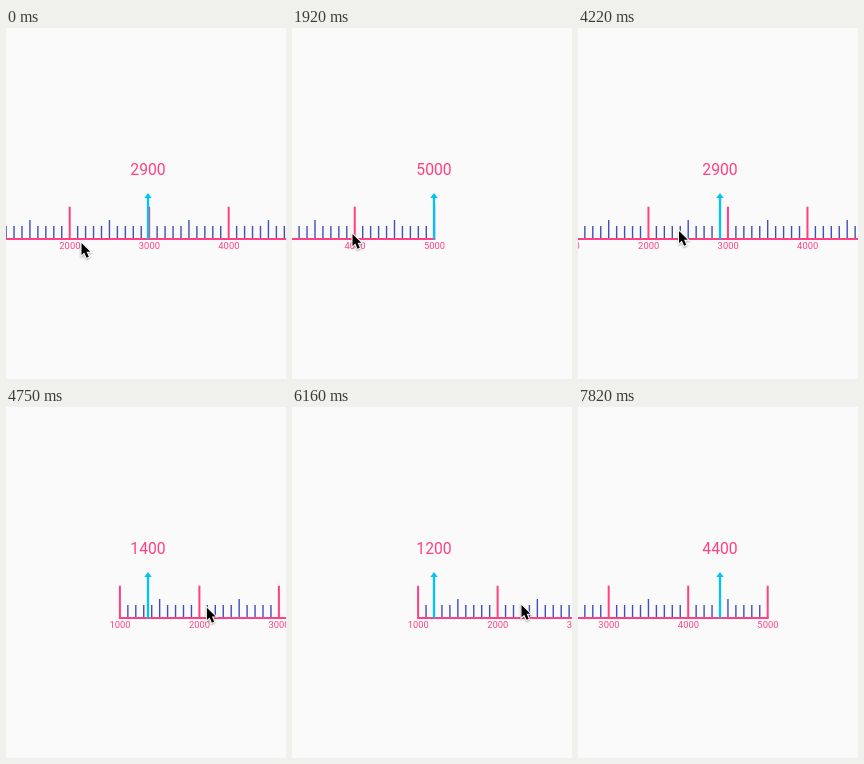
These frames come from a looping animation (280x351 px, 8190 ms). An HTML page with a canvas:

```html
<!DOCTYPE html>
<html lang="en">
<head>
<meta charset="utf-8">
<title>Ruler picker</title>
<style>
html, body { margin: 0; width: 100%; height: 100%; overflow: hidden; background: #fafafa; }
canvas { display: block; width: 280px; height: 351px; }
</style>
</head>
<body>
<canvas id="stage"></canvas>
<script>
const W = 280, H = 351, LOOP = 8190, STEP = 87.8;
const MIN = 1000, MAX = 5000, CENTER = 142, BASE = 211, SCALE = 0.0795;
const PINK = '#ff4081', INDIGO = '#3f51b5', CYAN = '#00c4f5';

const canvas = document.getElementById('stage');
const ctx = canvas.getContext('2d');
const dpr = window.devicePixelRatio || 1;
canvas.width = W * dpr;
canvas.height = H * dpr;
ctx.scale(dpr, dpr);

const smooth = p => p * p * (3 - 2 * p);
const glide = p => 1 - (1 - p) ** 5;
const move = (start, end, to, ease = smooth) => ({ start, end, to, ease });

// Follows a chain of eased moves; positions are arrays of coordinates.
function follow(from, moves, t) {
  let pos = from;
  for (const m of moves) {
    if (t <= m.start) break;
    const p = m.ease(Math.min((t - m.start) / (m.end - m.start), 1));
    pos = pos.map((v, i) => v + (m.to[i] - v) * p);
  }
  return pos;
}

// Ruler value under the arrow: drags, glides and snaps to a tick.
const scroll = [
  move(0, 80, [3000]),
  move(690, 1050, [4730]),
  move(1050, 2540, [5000], glide),
  move(3160, 4000, [2900]),
  move(4220, 5360, [1277], glide),
  move(5360, 5540, [1200]),
  move(6330, 6750, [4392]),
  move(6765, 6840, [4400])
];

const pointer = [
  move(90, 640, [213, 206]),
  move(690, 1050, [75, 209]),
  move(1050, 1740, [60, 205]),
  move(2750, 3150, [39.5, 199]),
  move(3160, 3520, [158, 203]),
  move(3690, 4130, [100.5, 202]),
  move(4220, 4570, [204, 200]),
  move(4570, 5270, [180, 199]),
  move(5450, 6240, [231, 197]),
  move(6330, 6750, [108.5, 217]),
  move(7130, 7780, [266, 355])
];

const valueAt = t => follow([2985], scroll, t)[0];

function vline(x, top, width, color) {
  ctx.fillStyle = color;
  ctx.fillRect(x - width / 2, top, width, BASE - top);
}

function label(text, x, y, size) {
  ctx.font = `${size}px Roboto, sans-serif`;
  ctx.textAlign = 'center';
  ctx.fillStyle = PINK;
  ctx.fillText(text, x, y);
}

function polygon(points) {
  ctx.beginPath();
  points.forEach(([x, y]) => ctx.lineTo(x, y));
  ctx.closePath();
}

function drawRuler(value) {
  const toX = v => CENTER + (v - value) * SCALE;
  for (let v = MIN; v <= MAX; v += 100) {
    const x = toX(v);
    if (x < -20 || x > W + 20) continue;
    if (v % 1000 === 0) {
      vline(x, 178.7, 2, PINK);
      label(v, x + 0.2, 221, 9.4);
    } else {
      vline(x, v % 500 ? 198 : 192, 1.4, INDIGO);
    }
  }
  const left = Math.max(toX(MIN) - 1, 0);
  ctx.fillStyle = PINK;
  ctx.fillRect(left, BASE - 1, Math.min(toX(MAX) + 1, W) - left, 2);
}

function drawArrow() {
  vline(CENTER, 168, 2.3, CYAN);
  polygon([[CENTER, 165], [CENTER + 3.7, 170], [CENTER - 3.7, 170]]);
  ctx.fill();
}

function drawPointer(x, y) {
  ctx.save();
  ctx.translate(x + 0.5, y + 1);
  ctx.scale(0.84, 0.84);
  polygon([[0, 0], [0, 14.5], [3.3, 11.4], [6, 17.6], [8.7, 16.4], [6, 10.4], [10.5, 10.4]]);
  ctx.shadowColor = 'rgba(0,0,0,.35)';
  ctx.shadowBlur = 2 * dpr;
  ctx.shadowOffsetY = dpr;
  ctx.strokeStyle = '#fff';
  ctx.lineWidth = 2.4;
  ctx.stroke();
  ctx.shadowColor = 'transparent';
  ctx.fillStyle = '#000';
  ctx.fill();
  ctx.restore();
}

// The readout trails the ruler in its direction of travel.
function readout(t, value) {
  const n = value / 100;
  const falling = valueAt(t - STEP) > value;
  return 100 * (falling ? Math.ceil(n - 0.05) : Math.floor(n + 0.05));
}

function draw(now) {
  const t = Math.floor((now % LOOP + 20) / STEP) * STEP;
  const value = valueAt(t);
  ctx.fillStyle = '#fafafa';
  ctx.fillRect(0, 0, W, H);
  drawRuler(value);
  drawArrow();
  label(readout(t, value), CENTER, 147.3, 15.7);
  drawPointer(...follow([75, 214], pointer, t));
}

const start = performance.now();
function tick() {
  draw(performance.now() - start);
  requestAnimationFrame(tick);
}
tick();
</script>
</body>
</html>
```
